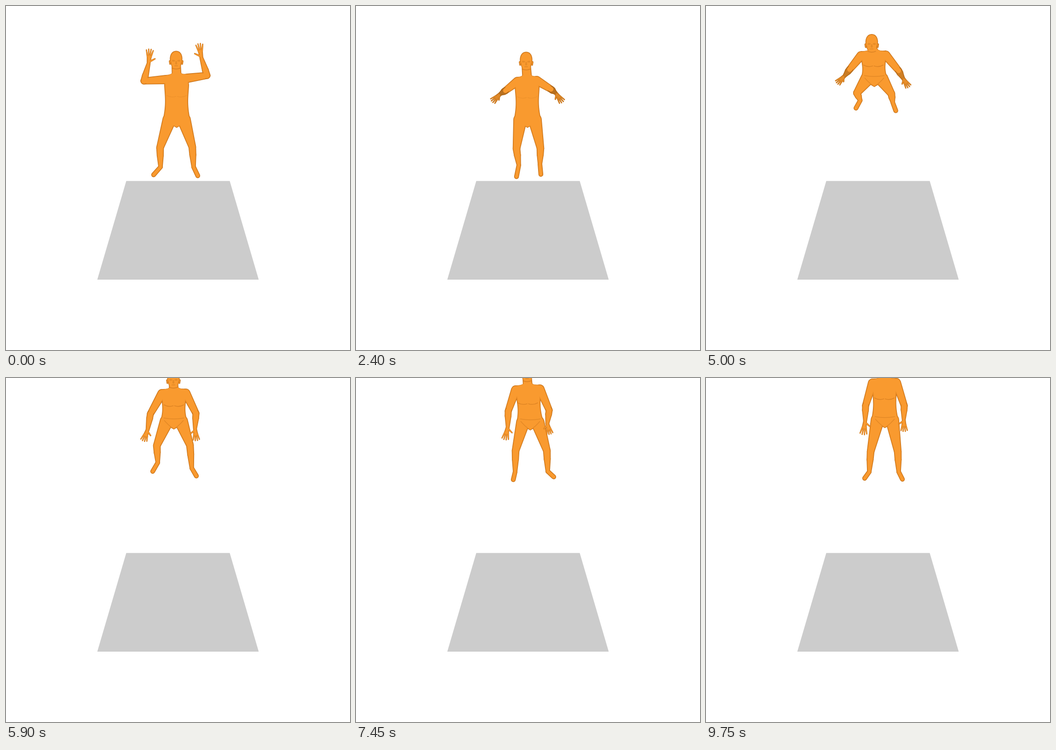
These frames come from a looping animation (748x748 px, 9800 ms). An HTML page with a canvas:

```html
<!DOCTYPE html>
<html lang="en">
<head>
<meta charset="utf-8">
<title>Jump</title>
<style>
html, body { margin: 0; width: 100%; height: 100%; overflow: hidden; background: #fff; }
canvas { display: block; }
</style>
</head>
<body>
<canvas id="stage" width="748" height="748"></canvas>
<script>
const ctx = document.getElementById('stage').getContext('2d');
const LOOP = 9800, STEP = 50;
const EDGE = [190, 108, 22], MID = [232, 138, 36], BODY = [249, 154, 47], SHADE = [150, 90, 22];

// Tracks: arm = shoulder, elbow, wrist, fingertip; leg = knee, ankle, toe.
const tracks = {};
const key = (ms, pose) => {
  for (const part in pose) (tracks[part] ??= []).push([ms, ...pose[part]]);
};

// Standing with raised arms
key(0, { head: [370, 117], crotch: [371, 264],
  armL: [347, 160, 300, 163, 310, 125, 313, 94], armR: [395, 157, 437, 151, 425, 113, 420, 82],
  legL: [335, 308, 336, 350, 321, 367], legR: [405, 306, 408, 350, 417, 369] });
key(500, {
  armL: [347, 156, 297, 158, 305, 107, 306, 74], armR: [395, 154, 437, 150, 430, 104, 428, 72] });
key(1000, { head: [369, 111], crotch: [371, 258],
  armL: [346, 154, 301, 157, 303, 120, 301, 86], armR: [395, 152, 437, 156, 434, 121, 434, 89],
  legL: [340, 306, 342, 353, 324, 370], legR: [405, 304, 409, 351, 417, 370] });
// Gathering
key(1700, { head: [370, 117], crotch: [372, 265],
  armL: [347, 160, 306, 174, 299, 160, 286, 147], armR: [395, 159, 435, 173, 443, 160, 457, 148],
  legL: [341, 316, 349, 360, 340, 383], legR: [404, 309, 405, 350, 411, 370] });
key(2400, { head: [370, 119], crotch: [373, 264],
  armL: [351, 164, 325, 184, 314, 191, 296, 208], armR: [393, 162, 424, 181, 434, 189, 449, 209],
  legL: [349, 310, 354, 346, 349, 371], legR: [401, 309, 400, 344, 402, 366] });
key(2700, { head: [370, 123], crotch: [373, 262],
  armL: [350, 165, 317, 181, 305, 187, 290, 196], armR: [394, 163, 431, 180, 441, 186, 456, 196],
  legL: [345, 311, 354, 353, 350, 377], legR: [404, 311, 401, 350, 404, 374] });
// Leap
key(3000, { head: [368, 97], crotch: [371, 211],
  armL: [346, 135, 312, 146, 299, 151, 281, 158], armR: [396, 133, 427, 146, 439, 151, 454, 160],
  legL: [342, 242, 352, 275, 349, 302], legR: [402, 242, 404, 274, 406, 298] });
key(3900, { head: [360, 85], crotch: [366, 181],
  armL: [339, 113, 318, 140, 308, 149, 291, 161], armR: [391, 111, 402, 150, 400, 177, 400, 202],
  legL: [335, 199, 352, 208, 355, 228], legR: [402, 207, 406, 222, 407, 236] });
// Crouch, then rise
key(4600, { head: [358, 88], crotch: [366, 180],
  armL: [337, 115, 315, 145, 305, 156, 287, 169], armR: [390, 113, 408, 153, 411, 177, 417, 201],
  legL: [331, 197, 345, 208, 342, 228], legR: [403, 201, 407, 219, 410, 233] });
key(5100, { head: [361, 77], crotch: [366, 173],
  armL: [337, 105, 312, 135, 301, 150, 285, 168], armR: [391, 104, 420, 136, 430, 151, 443, 170],
  legL: [328, 186, 334, 204, 324, 220], legR: [403, 187, 406, 208, 413, 226] });
key(5900, { head: [364, 2], crotch: [365, 111],
  armL: [339, 34, 314, 78, 308, 112, 299, 137], armR: [391, 33, 413, 77, 411, 110, 414, 136],
  legL: [328, 147, 330, 184, 319, 203], legR: [400, 146, 404, 196, 414, 213] });
key(6400, {
  armL: [342, 30, 325, 75, 326, 106, 317, 131], armR: [396, 30, 428, 69, 447, 86, 467, 99],
  legL: [335, 151, 339, 196, 330, 214], legR: [404, 152, 410, 204, 421, 223] });
// Settling
key(7450, { head: [372, -12], crotch: [379, 113],
  armL: [347, 26, 331, 72, 330, 106, 324, 134], armR: [400, 24, 420, 70, 416, 99, 422, 122],
  legL: [347, 158, 346, 204, 342, 221], legR: [415, 158, 417, 203, 430, 215] });
key(9750, { head: [388, -32], crotch: [389, 108],
  armL: [362, 11, 347, 60, 346, 93, 342, 123], armR: [414, 10, 431, 60, 430, 90, 431, 116],
  legL: [358, 160, 355, 204, 345, 218], legR: [417, 160, 419, 204, 427, 220] });

// Cubic interpolation that never overshoots a key
const rate = (a, b, i) => (b[i] - a[i]) / (b[0] - a[0]);
function slope(keys, n, i) {
  if (!keys[n - 1] || !keys[n + 1]) return 0;
  const p = rate(keys[n - 1], keys[n], i), q = rate(keys[n], keys[n + 1], i);
  return p * q > 0 ? 2 * p * q / (p + q) : 0;
}
function sample(part, t) {
  const keys = tracks[part];
  let n = 0;
  while (n < keys.length - 2 && t >= keys[n + 1][0]) n++;
  const a = keys[n], b = keys[n + 1], span = b[0] - a[0];
  const u = (t - a[0]) / span, v = 1 - u;
  const points = [];
  for (let i = 1; i < a.length; i++) {
    const value = a[i] * v * v * (1 + 2 * u) + b[i] * u * u * (3 - 2 * u)
      + span * u * v * (v * slope(keys, n, i) - u * slope(keys, n + 1, i));
    if (i % 2) points.push([value]); else points[points.length - 1].push(value);
  }
  return points;
}

const mix = (p, q, f) => p.map((value, i) => value + (q[i] - value) * f);
const rgb = color => `rgb(${color.map(Math.round)})`;
const distance = (p, q) => Math.hypot(q[0] - p[0], q[1] - p[1]);
const polar = (p, angle, length) => [p[0] + Math.cos(angle) * length, p[1] + Math.sin(angle) * length];

// Tapered capsule
function limb(a, b, ra, rb) {
  const angle = Math.atan2(b[1] - a[1], b[0] - a[0]), quarter = Math.PI / 2;
  ctx.beginPath();
  ctx.arc(...a, Math.max(ra, 0.3), angle + quarter, angle - quarter);
  ctx.arc(...b, Math.max(rb, 0.3), angle - quarter, angle + quarter);
  ctx.fill();
}

function torso(left, right, crotch, inset) {
  const chest = mix(left, right, 0.5), hip = [crotch[0], crotch[1] - 16];
  const at = (f, side, width) => {
    const p = mix(chest, hip, f);
    return [p[0] + side * (width - inset), p[1]];
  };
  ctx.beginPath();
  ctx.moveTo(chest[0] - 9 + inset, chest[1] - 15);
  ctx.quadraticCurveTo(chest[0] - 10, chest[1] - 9, left[0], left[1] - 10 + inset);
  ctx.lineTo(...at(0.15, -1, 27));
  ctx.bezierCurveTo(...at(0.4, -1, 26), ...at(0.6, -1, 22), ...at(1, -1, 30));
  ctx.lineTo(hip[0] - 15, hip[1] + 8);
  ctx.lineTo(crotch[0], crotch[1] + 1 - inset);
  ctx.lineTo(hip[0] + 15, hip[1] + 8);
  ctx.lineTo(...at(1, 1, 30));
  ctx.bezierCurveTo(...at(0.6, 1, 22), ...at(0.4, 1, 26), ...at(0.15, 1, 27));
  ctx.lineTo(right[0], right[1] - 10 + inset);
  ctx.quadraticCurveTo(chest[0] + 10, chest[1] - 9, chest[0] + 9 - inset, chest[1] - 15);
  ctx.fill();
  return chest;
}

function head([x, y], inset) {
  const w = 14 - inset, h = 19.5 - inset;
  ctx.beginPath();
  ctx.moveTo(x, y - h);
  ctx.bezierCurveTo(x + w * 0.9, y - h, x + w * 1.15, y - 4, x + w * 0.85, y + 7);
  ctx.bezierCurveTo(x + w * 0.75, y + 16, x + 6, y + h, x, y + h);
  ctx.bezierCurveTo(x - 6, y + h, x - w * 0.75, y + 16, x - w * 0.85, y + 7);
  ctx.bezierCurveTo(x - w * 1.15, y - 4, x - w * 0.9, y - h, x, y - h);
  ctx.fill();
  for (const side of [-1, 1]) limb([x + side * 13.5, y + 3], [x + side * 13, y + 9], 2.3 - inset, 1.8 - inset);
}

function leg(hip, [knee, ankle, toe], inset) {
  const calf = mix(knee, ankle, 0.4);
  limb(hip, knee, 15 - inset, 8.3 - inset);
  limb(knee, calf, 8.3 - inset, 7.6 - inset);
  limb(calf, ankle, 7.6 - inset, 4.8 - inset);
  limb(ankle, toe, 5 - inset, 5.2 - inset);
}

function hand(wrist, tip, inner, inset) {
  const angle = Math.atan2(tip[1] - wrist[1], tip[0] - wrist[0]), length = distance(wrist, tip);
  const palm = polar(wrist, angle, length * 0.45), r = Math.max(1.5 - inset * 0.5, 0.5);
  limb(wrist, palm, 4 - inset, 5.2 - inset);
  for (const k of [-1.5, -0.5, 0.5, 1.5]) {
    const root = polar(palm, angle + Math.PI / 2, k * 2.4);
    limb(root, polar(root, angle + k * 0.17, length * (0.58 - Math.abs(k) * 0.06)), r + 0.3, r - 0.2);
  }
  const thumb = angle - inner * Math.sin(angle) * 0.85;
  limb(polar(wrist, angle, 3), polar(wrist, thumb, length * 0.55), r + 0.8, r);
}

const layers = [[EDGE, 0], [MID, 0.8], [BODY, 2.2]];

function drawArm([shoulder, elbow, wrist, tip], inner) {
  const dark = Math.max(0, Math.min(0.75, 1.15 - distance(elbow, wrist) / 26));
  for (const [color, inset] of layers) {
    ctx.fillStyle = rgb(mix(color, SHADE, dark * 0.4));
    hand(wrist, tip, inner, inset);
    ctx.fillStyle = rgb(mix(color, SHADE, dark));
    const bulge = mix(elbow, wrist, 0.3);
    limb(elbow, bulge, 7.6 - inset, 7.4 - inset);
    limb(bulge, wrist, 7.4 - inset, 4.3 - inset);
  }
  ctx.fillStyle = rgb(BODY);
  limb(shoulder, elbow, 7.8, 5.2);
}

function crease(x, y, dx, dy, bend) {
  ctx.beginPath();
  ctx.moveTo(x, y);
  ctx.quadraticCurveTo(x + dx / 2, y + dy / 2 + bend, x + dx, y + dy);
  ctx.stroke();
}

function details(face, chest, crotch, t) {
  const [x, y] = face, trunk = crotch[1] - 16 - chest[1];
  ctx.fillStyle = 'rgba(165,90,15,.22)';
  limb([x - 7, y + 2], [x - 4, y + 2], 2, 1.6);
  limb([x + 4, y + 2], [x + 7, y + 2], 1.6, 2);
  limb([x, y + 4], [x, y + 8], 1.4, 2.2);
  limb([x - 3, y + 13], [x + 3, y + 13], 0.9, 0.9);
  const near = Math.max(0, Math.min(1, (t - 2700) / 600));
  ctx.lineWidth = 1.4;
  ctx.strokeStyle = `rgba(175,96,18,${0.12 + near * 0.28})`;
  crease(chest[0] - 22, chest[1] + trunk * 0.4, 21, 2, 5);
  crease(chest[0] + 1, chest[1] + trunk * 0.4 + 2, 21, -2, 5);
  ctx.strokeStyle = `rgba(175,96,18,${near * 0.3})`;
  crease(crotch[0] - 22, crotch[1] - 24, 44, 0, 4);
  crease(crotch[0] - 21, crotch[1] - 19, 18, 17, 2);
  crease(crotch[0] + 21, crotch[1] - 19, -18, 17, 2);
  ctx.strokeStyle = 'rgba(165,88,15,.4)';
  crease(x - 9, y + 18, 18, 0, 4);
}

function floor() {
  ctx.fillStyle = '#ccc';
  ctx.beginPath();
  ctx.moveTo(261.5, 380.5);
  ctx.lineTo(486.5, 380.5);
  ctx.lineTo(549.5, 595);
  ctx.lineTo(198.5, 595);
  ctx.fill();
}

function draw() {
  const t = Math.floor(performance.now() % LOOP / STEP) * STEP;
  const [face] = sample('head', t), [crotch] = sample('crotch', t);
  const armL = sample('armL', t), armR = sample('armR', t);
  const legL = sample('legL', t), legR = sample('legR', t);
  const hip = side => [crotch[0] + side * 16, crotch[1] - 16];
  let chest;

  ctx.clearRect(0, 0, 748, 748);
  floor();
  for (const [color, inset] of layers) {
    ctx.fillStyle = rgb(color);
    leg(hip(-1), legL, inset);
    leg(hip(1), legR, inset);
    chest = torso(armL[0], armR[0], crotch, inset);
    limb([face[0], face[1] + 8], [chest[0], chest[1] - 8], 10 - inset, 10.5 - inset);
    for (const [shoulder, elbow] of [armL, armR]) limb(shoulder, elbow, 10 - inset, 7.6 - inset);
    head(face, inset);
  }
  details(face, chest, crotch, t);
  drawArm(armL, 1);
  drawArm(armR, -1);
  requestAnimationFrame(draw);
}
draw();
</script>
</body>
</html>
```
